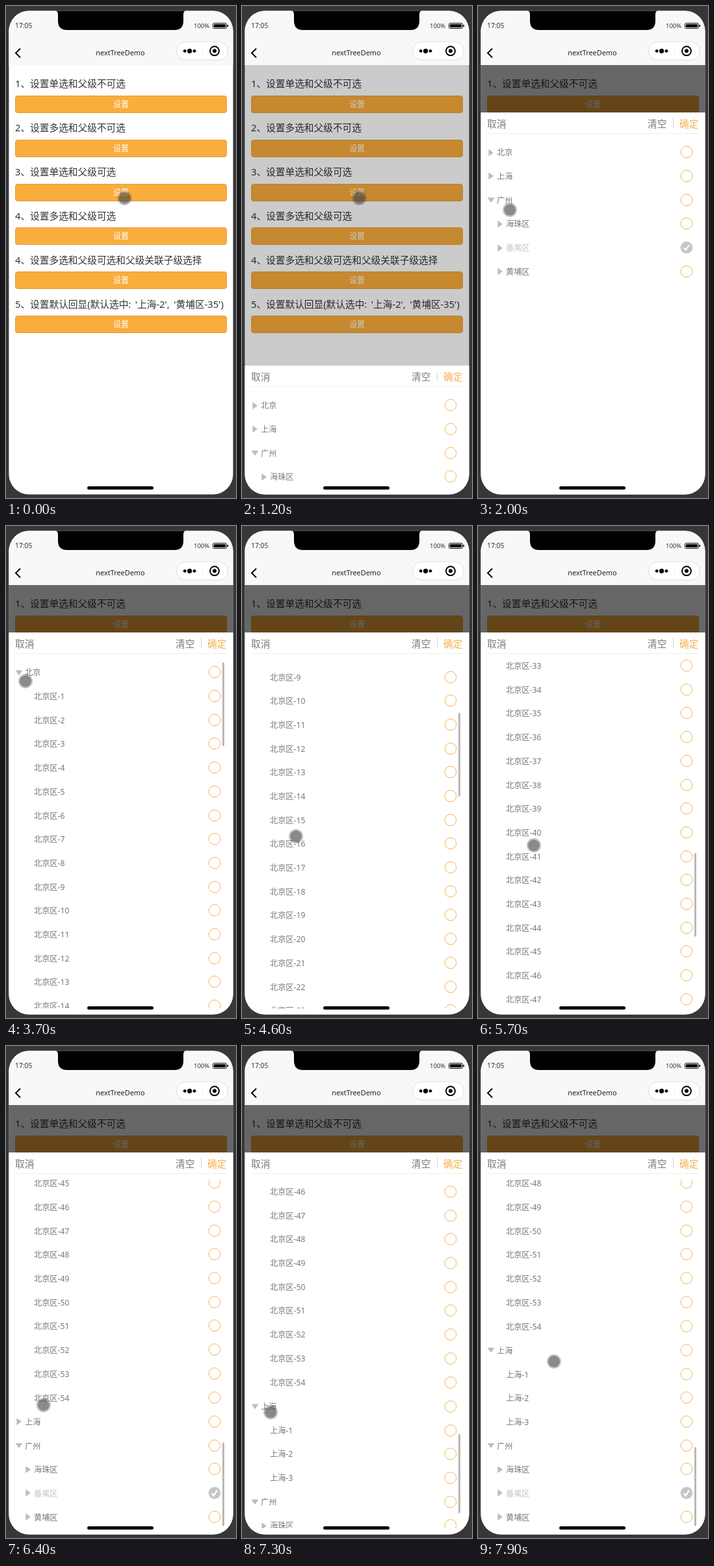
Animation, 354 px wide and 758 px high, one loop 8000 ms. Source, as an HTML page:

```html
<!DOCTYPE html>
<html lang="zh-CN">
<head>
<meta charset="utf-8">
<title>nextTreeDemo</title>
<style>
@property --scroll { syntax: "<number>"; inherits: true; initial-value: 0; }
@property --ratio { syntax: "<number>"; inherits: true; initial-value: 0.2407; }

:root { --loop: 8s; --orange: #f9ad3d; --row: 36.7px; }
html, body { margin: 0; width: 354px; height: 758px; overflow: hidden; background: #373737; }
body { position: relative; font-family: "Noto Sans", "Noto Sans CJK SC", "Noto Sans CJK", sans-serif; color: #333; }
div, span, svg { position: absolute; box-sizing: border-box; white-space: nowrap; }

.screen { inset: 0; clip-path: inset(7.5px 4.5px 5.5px 4.4px round 31px); background: #fff; }
.t { line-height: 20px; margin-top: -10px; }
.label { left: 14px; font-size: 14.7px; word-spacing: 2.6px; }
.btn { left: 14px; width: 326px; height: 27px; border: 1px solid #e2a03c; border-radius: 4px; background: var(--orange);
  color: #fff; font-size: 12px; line-height: 25px; text-align: center; }
.mask { inset: 91px 0 0; background: #000; opacity: 0; animation: fade var(--loop) infinite; }
.sheet { left: 0; top: 164px; width: 354px; height: 590px; background: #fff; animation: rise var(--loop) infinite; }
.sheet > .t { font-size: 14.7px; top: 17px; color: #777; }
.list { left: 0; top: 42px; width: 354px; height: 537px; overflow: hidden; animation: scroll var(--loop) linear infinite, ratio var(--loop) step-end infinite; }
.rows { top: 1.6px; left: 0; width: 354px; transform: translateY(calc(var(--scroll) * -1px)); }
.row, .kids { position: relative; width: 354px; }
.row { height: var(--row); line-height: var(--row); font-size: 12.2px; color: #777; }
.row > span { top: .8px; }
.row.off { color: #c4c4c4; }
.row svg { top: 8.2px; overflow: visible; }
.kids { overflow: hidden; height: 0; }
.bj { animation: openBj var(--loop) step-end infinite; }
.sh { animation: openSh var(--loop) step-end infinite; }
.turnBj { animation: turnBj var(--loop) step-end infinite; }
.turnSh { animation: turnSh var(--loop) step-end infinite; }
.arrow { fill: #bcbcbc; transform-origin: 10px 10px; }
.down { transform: rotate(90deg); }
.thumb { left: 333px; top: 4px; width: 3px; height: 129px; border-radius: 1.5px; background: #b8b8b8;
  transform: translateY(calc(var(--scroll) * var(--ratio) * 1px)); animation: thumb var(--loop) step-end infinite; }
.home { left: 125px; top: 740px; width: 102px; height: 5px; border-radius: 3px; background: #000; }
.cursor { left: -11px; top: -11px; width: 22px; height: 22px; border-radius: 50%;
  background: rgba(60,60,60,.6); border: 2px solid rgba(60,60,60,.3); background-clip: padding-box;
  animation: cursor var(--loop) linear infinite; }

@keyframes fade {
  0%, 14.19% { opacity: 0; animation-timing-function: ease; }
  17.94%, 100% { opacity: .6; }
}
@keyframes rise {
  0%, 14.19% { transform: translateY(590px); animation-timing-function: ease; }
  17.94%, 100% { transform: none; }
}
@keyframes openBj { 0% { height: 0; } 46.2%, 100% { height: calc(54 * var(--row)); } }
@keyframes openSh { 0% { height: 0; } 83.7%, 100% { height: calc(3 * var(--row)); } }
@keyframes turnBj { 0% { transform: none; } 46.2%, 100% { transform: rotate(90deg); } }
@keyframes turnSh { 0% { transform: none; } 83.7%, 100% { transform: rotate(90deg); } }
@keyframes thumb {
  0% { visibility: hidden; height: 129px; }
  46.2% { visibility: visible; height: 129px; }
  83.7%, 100% { visibility: visible; height: 122px; }
}
@keyframes ratio { 0% { --ratio: .2407; } 83.7%, 100% { --ratio: .2297; } }
@keyframes scroll {
  0%, 50% { --scroll: 0; }
  60% { --scroll: 430; }
  63.75% { --scroll: 658; }
  71.25% { --scroll: 1220; }
  77.5%, 90% { --scroll: 1665.4; }
  96%, 100% { --scroll: 1775.4; }
}
@keyframes cursor {
  0%, 7.4% { transform: translate(182.5px, 296px); }
  7.5%, 17.5% { transform: translate(180.5px, 296px); }
  25% { transform: translate(49px, 314px); }
  35% { transform: translate(48px, 309px); }
  42.5%, 50% { transform: translate(30px, 239px); }
  57.5% { transform: translate(83px, 478px); }
  63.75%, 72.5% { transform: translate(86px, 492px); }
  80% { transform: translate(58px, 553px); }
  82.5%, 90% { transform: translate(21px, 589px); }
  95% { transform: translate(112px, 491px); }
  98.75%, 100% { transform: translate(117px, 486px); }
}
</style>
</head>
<body>
<div class="screen">
  <div id="page"></div>
  <div class="mask"></div>
  <div class="sheet">
    <span class="t" style="left:14px">取消</span>
    <span class="t" style="left:261px">清空</span>
    <div style="left:300px;top:9px;width:1px;height:15px;background:#d2d2d2"></div>
    <span class="t" style="left:310px;color:#f4b04c">确定</span>
    <div style="left:14px;top:32px;width:326px;height:1px;background:#eee"></div>
    <div class="list"><div class="rows" id="rows"></div><div class="thumb"></div></div>
  </div>
  <div style="left:0;top:0;width:354px;height:91px;background:#f8f8f8"></div>
  <svg width="354" height="91">
    <path d="M77 7H276Q273 9 273 13V23Q273 37 259 37H94Q80 37 80 23V13Q80 9 77 7Z"/>
    <path d="M22 65.5L15 72.5L22 79.5" fill="none" stroke="#000" stroke-width="2"/>
    <rect x="262.5" y="55" width="79" height="28" rx="14" fill="#fff" stroke="#dedede"/>
    <circle cx="275.2" cy="69.3" r="2.4"/><circle cx="282.6" cy="69.3" r="3.6"/><circle cx="290" cy="69.3" r="2.4"/>
    <path d="M302.5 61V78" stroke="#f2f2f2"/>
    <circle cx="321" cy="69.3" r="7" fill="none" stroke="#000" stroke-width="2"/><circle cx="321" cy="69.3" r="3"/>
    <rect x="318.5" y="26.5" width="21" height="8" rx="2" fill="none" stroke="#000"/>
    <rect x="320" y="28" width="18" height="5" rx="1"/><rect x="340.5" y="29" width="1.5" height="3"/>
  </svg>
  <span class="t" style="left:14px;top:29.5px;font-size:10.3px">17:05</span>
  <span class="t" style="left:289px;top:30.5px;font-size:9.5px">100%</span>
  <span class="t" style="left:76px;width:200px;top:71.5px;font-size:10.9px;text-align:center;color:#222">nextTreeDemo</span>
  <div class="home"></div>
</div>
<div class="cursor"></div>
<script>
const labels = [
  "1、设置单选和父级不可选", "2、设置多选和父级不可选", "3、设置单选和父级可选",
  "4、设置多选和父级可选", "4、设置多选和父级可选和父级关联子级选择",
  "5、设置默认回显(默认选中: '上海-2', '黄埔区-35')"
];
page.innerHTML = labels.map((text, i) => {
  const y = i * 67.9;
  return `<span class="t label" style="top:${119 + y}px">${text}</span>
    <div class="btn" style="top:${137.7 + y}px">设置</div>`;
}).join("");

const ring = '<circle cx="10" cy="10" r="8.8" fill="none" stroke="#f4b356"/>';
const tick = '<circle cx="10" cy="10" r="9.3" fill="#c6c6c6"/><path d="M5.5 10.5L8.8 13.8L14 6" fill="none" stroke="#fff" stroke-width="2.2"/>';

// depth 0 or 1; turn is the arrow's class, null for a leaf
function row(text, depth, turn, off) {
  const arrow = turn === null ? "" :
    `<svg width="20" height="20" style="left:${10 + depth * 13.5}px"><path class="arrow ${turn}" d="M6.3 4.5L14 10L6.3 15.5Z"/></svg>`;
  return `<div class="row ${off ? "off" : ""}">${arrow}<span style="left:${29 + depth * 14}px">${text}</span>
    <svg width="20" height="20" style="left:311px;top:7.8px">${off ? tick : ring}</svg></div>`;
}
const kids = (name, count, cls) =>
  `<div class="kids ${cls}">${Array.from({ length: count }, (_, i) => row(`${name}-${i + 1}`, 1, null)).join("")}</div>`;

rows.innerHTML =
  row("北京", 0, "turnBj") + kids("北京区", 54, "bj") +
  row("上海", 0, "turnSh") + kids("上海", 3, "sh") +
  row("广州", 0, "down") +
  row("海珠区", 1, "") + row("番禺区", 1, "", true) + row("黄埔区", 1, "");
</script>
</body>
</html>
```
